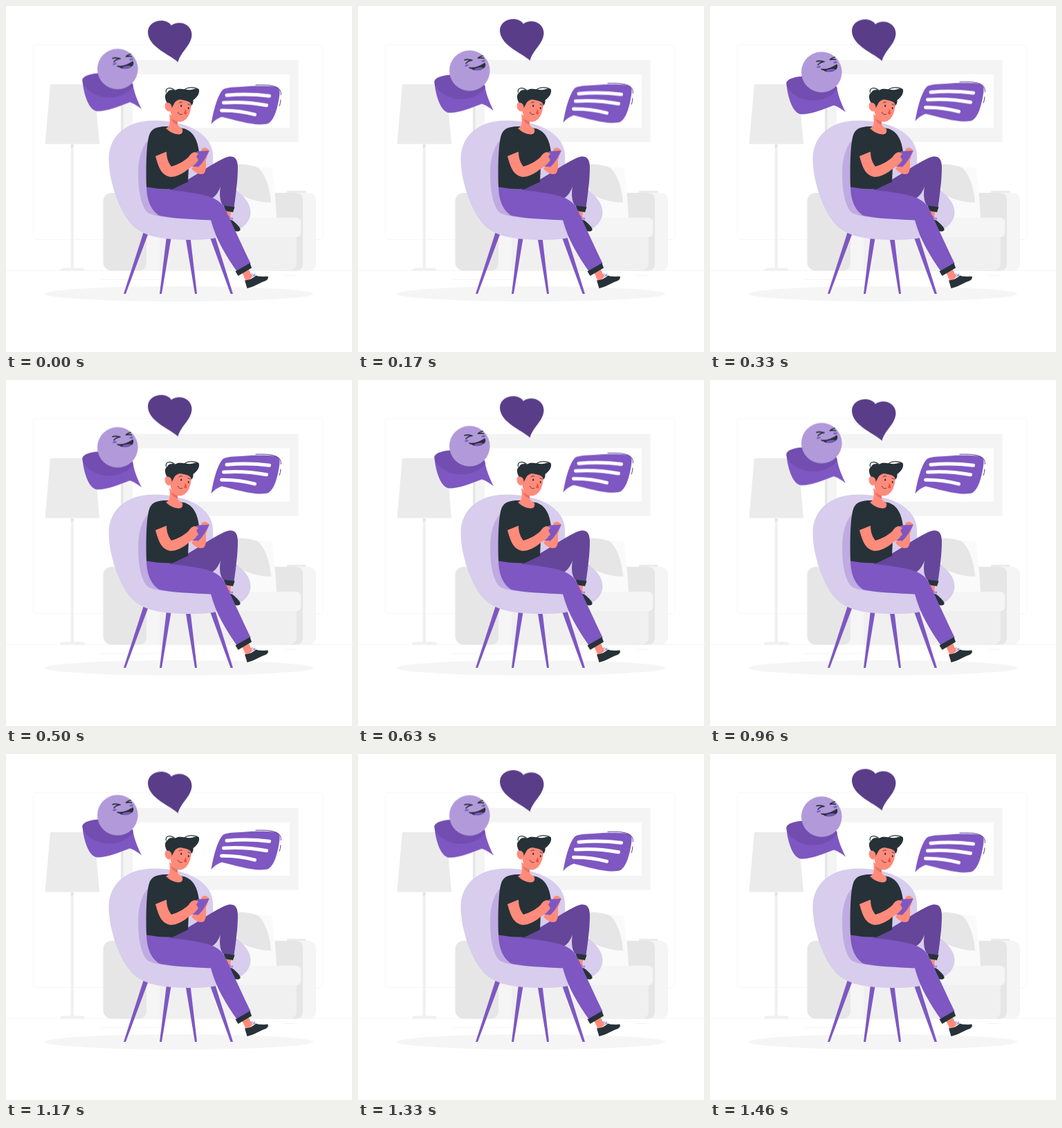
Recreate the animation shown at these times as an HTML page. Size 500 by 500 pixels, loop 1500 ms.

```html
<!DOCTYPE html>
<html lang="en">
<head>
<meta charset="utf-8">
<title>Chatting at home</title>
<style>
  html, body { margin: 0; width: 100%; height: 100%; overflow: hidden; background: #fff; }
  svg { display: block; width: 100%; height: 100%; }
  .main { fill: #7e57c2; }
  .dark { fill: #263238; }
  .skin { fill: #ff8b7b; }
  .ink { fill: none; stroke: #263238; stroke-linecap: round; stroke-linejoin: round; }
  .float { animation: float 1.5s linear infinite; }
  .message { animation-delay: -20ms; }
  .smile { animation-delay: -1015ms; }
  .heart { animation-delay: -519ms; }
  @keyframes float {
    50% { transform: translateY(-10px); }
  }
</style>
</head>
<body>
<svg viewBox="0 0 500 500">
  <defs>
    <path id="talk" d="M110.500 106C113 100 124 98 134 97L183 112C184.500 121 187 129 190 136C192 141 194 145 196 149C191 145 185 141 179 139C163 145 147 152 132 152C118 151 111 121 110.500 106Z"/>
    <clipPath id="talkClip"><use href="#talk"/></clipPath>
  </defs>

  <!-- room -->
  <g fill="none" stroke="#f5f5f5">
    <rect x="39.500" y="55.500" width="418.500" height="282" rx="4" stroke-width=".8"/>
    <path d="M0 382.500H500M135 395.500H222M400 389.500H417"/>
  </g>
  <path fill="#e6e6e6" d="M166 78H172V196H166Z"/>
  <path fill="#f4f4f4" d="M169.500 78H422.500V196.500H169.500Z"/>
  <path fill="#fff" d="M183 98.500H410V176H183Z"/>

  <!-- lamp -->
  <path fill="#f0f0f0" d="M93.700 200H97.800V380H93.700ZM78 382.500C78 380 80 378.500 83 378.500H109C112 378.500 114 380 114 382.500Z"/>
  <path fill="#e4e4e4" d="M93.700 200H97.800V203L93.700 206Z"/>
  <path fill="#ebebeb" d="M64 113H127.500L135 199.500H56.500Z"/>

  <!-- sofa -->
  <rect x="160" y="270" width="250" height="112.500" fill="#f0f0f0"/>
  <rect x="400" y="270" width="48" height="112.500" rx="11" fill="#f5f5f5"/>
  <path fill="#e6e6e6" d="M388 270H418Q429 270 429 281V371Q429 382.500 418 382.500H388Z"/>
  <rect x="140.500" y="270" width="63" height="112.500" rx="12" fill="#e6e6e6"/>
  <path fill="#f0f0f0" d="M222 333H420V371Q420 382.500 408 382.500H222Z"/>
  <path fill="#f5f5f5" d="M203 333H222V382.500H197Q203 380 203 371Z"/>
  <path fill="#fafafa" d="M334 229C352 230 370 233 384 234C387 255 390 280 391 308H334Z"/>
  <path fill="#e6e6e6" d="M334 229C345 228 358 230 366 235C376 246 382 266 383 284C365 284 347 278 334 270Z"/>
  <rect x="222" y="306" width="204" height="28" rx="6" fill="#f5f5f5"/>
  <path fill="#ebebeb" d="M406 270V268Q406 267 408 267H432Q434 267 434 270Z"/>

  <ellipse cx="250" cy="416" rx="194" ry="11" fill="#f5f5f5"/>

  <!-- chair -->
  <path class="main" d="M200 323L207 325L173 416H170ZM232 333H239L225 416H222ZM259.500 335H266.500L276 416H273ZM295 335L302.500 334L328 416H324.500Z"/>
  <path fill="#d8cded" d="M148.500 222C148 190 172 165 215 165.500C266 166 297 187 299 214C299 230 300 243 304 251C332 262 354 279 353.500 299C353 321 320 338 271 338C225 338 196 333 180 314C164 296 149 255 148.500 222Z"/>
  <path fill="#bfabe1" d="M210 190C197 199 191 220 191 242C191 267 195 288 204 298C215 306 255 308 298 309L296 270L240 250Z"/>

  <!-- far leg -->
  <path class="skin" d="M318 295L325 296L324 308L330 314L320 311Z"/>
  <path class="dark" d="M321 309C325 308 328 310 331 313C335 317 339 320 338.500 324C336 327 331 326 327 323Z"/>
  <path class="ink" stroke-width=".8" style="stroke:#7e57c2" d="M322 309C320 303 325 303 325 308C328 303 329 309 325 310"/>
  <path fill="#65469b" d="M234 266C262 254 290 232 316 219.500C329 214 335 220 335 233C335 253 332 273 329.500 291L314 289C309 283 308 272 310 261C307 269 303 275 297 278L250 271Z"/>
  <path class="dark" d="M315 288.500L330.500 290.500L328 298L316 296Z"/>

  <!-- near leg -->
  <path class="skin" d="M341 385L351 381L356 392L347 398Z"/>
  <path class="main" d="M203 260C228 266 256 267 280 272C302 276 313 283 319 298C329 320 342 348 353.500 372L334 384C317 360 303 336 296 309.500C268 308 240 307 222 303C208 295 203 277 203 260Z"/>
  <path class="dark" d="M331.500 383.500L352.500 371.500L355 378.500L335.500 390Z"/>
  <path class="dark" d="M345 396.500C352 396 358 393 361 389.500C367 391.500 374 391 378.500 390.500C379.500 394 378 396 374 397.500C365 401 358 406 348.500 408Z"/>
  <path class="ink" stroke-width=".8" style="stroke:#7e57c2" d="M357 391C352 387 356 385 358 390C359 385 362 388 358 391"/>

  <!-- torso -->
  <path class="dark" d="M234 174C222 174 212 175.500 208 184C203 195 202 228 203 261.500C219 264 233 265.500 241 264.500L263 254L264 232L279 211C277 194 271 181 257 177Z"/>
  <path class="skin" d="M236 156L248 166C247 171 249 174 255 178C256 183 254 185.500 249 185.500C241 185 234 180 231 176.500C236 175 238 171 236 156Z"/>
  <path fill="#e5705f" d="M239 163L248 167V171C243 170 240 167 239 163Z"/>

  <!-- hands -->
  <path class="skin" d="M268 235L280 222L282 208C285 203 290 204 294 209L289 222C289 230 290 237 286 242C279 245 272 240 268 235Z"/>
  <path class="main" d="M276 210L293.500 209C289 219 284 227 278 232.500L266 231.500Z"/>
  <path class="skin" d="M216 217L232 210.500C232 220 235 227 239 232C249 229 258 224 264 218C267 213 272 210 276 212L278 214L275 217L278 223L272 230C264 234 254 246 239 247C224 246 220 231 216 217Z"/>

  <!-- head -->
  <path class="skin" d="M240 137C248 129 262 131 268 137C268 147 266 156 262 161C258 167 251 169 245 166C240 163 238 156 237 149Z"/>
  <ellipse class="skin" cx="234.500" cy="145.500" rx="4.800" ry="7" transform="rotate(-14 234.500 145.500)"/>
  <path class="dark" d="M239.500 147.500C240 143 237 139 232.500 139.500C229 133 229 128 233 125C236 120 241 121 245 121.500C252 117 262 123 270 120.500C274 119 277 119 279 121.500C280 127 275 133 270.500 136C271 139 270 142 268 144C267 139 263 137 256 136C250 134 245 137 243 141Z"/>
  <path class="ink" stroke-width="1.200" d="M231.500 125C230 119 236 116.500 243 121M258 121C262 117 273 116.500 278.500 121"/>
  <g class="dark">
    <ellipse cx="253.200" cy="144.200" rx="1" ry="1.700"/>
    <ellipse cx="263.700" cy="147.600" rx="1" ry="1.700"/>
  </g>
  <path class="ink" stroke-width=".8" d="M250 140Q252 138 254.500 139M263 142Q265 141.500 266.500 143.500"/>
  <path fill="#e5503d" d="M259.500 149C260.500 152 261.500 154 261 156C259.500 157 258 156 257 155.500Z"/>
  <path class="ink" stroke-width=".8" d="M248.500 153.500C249 156 252 157.500 254.500 156.500"/>

  <!-- laughing face -->
  <g class="float smile"><g transform="translate(0 6.470)">
    <use href="#talk" class="main"/>
    <ellipse cx="149" cy="99" rx="41" ry="33" fill="#714eaf" clip-path="url(#talkClip)"/>
    <circle cx="161.300" cy="91" r="29.300" fill="#b29ada"/>
    <path class="ink" stroke-width="1.700" d="M154 75.500C157 74.500 161 75 165 76C161 76.500 158 78 156 80.500M180 69.500C177 70 175 71.500 173.500 73C176 72.500 179 72.500 181.500 73"/>
    <g class="main">
      <ellipse cx="157" cy="83.500" rx="3" ry="1.300" transform="rotate(-10 157 83.500)"/>
      <ellipse cx="181" cy="77" rx="3" ry="1.300" transform="rotate(-6 181 77)"/>
    </g>
    <path class="dark" d="M160 86C168 87.500 176 84.500 183 79.500C185 81 184.500 84 183 86.500C178 91.500 168 92 164 88.500C162 88.500 160 87.500 160 86Z"/>
    <path class="main" d="M167 89.500C171 86.500 178 85.500 181.500 87C178 90.500 171 91.500 167 89.500Z"/>
  </g></g>

  <!-- heart -->
  <g class="float heart">
    <path fill="#593d89" transform="translate(0 6.920)" d="M248.500 81C236 69.500 205 59 205 37C206 20 231 16 239 28C249 20 268 25 268.500 41C268 57 253 65 248.500 81Z"/>
  </g>

  <!-- message -->
  <g class="float message">
    <path class="main" d="M296.500 171.200C299.500 153 305 131 313 121.500C316 118.500 326 117.500 340 117C358 115.500 375 115.500 388 116.800C394 117.500 396 120 395.500 127C393 148 387 166 379 170C363 175 335 166 312 160.500C306 162.500 300 166.500 296.500 171.200Z"/>
    <path fill="none" stroke="#fff" stroke-width="5" stroke-linecap="round" d="M319 129.200Q350 126.500 380.500 130.200M314.500 140Q346 138 376.500 143.800M311.500 151.200Q336 150.700 359.500 157.200"/>
    <path class="ink" stroke-width="1" style="stroke:#593d89" d="M361 114.300C382 113.500 399 115.500 397.300 128.500M397 136Q396.600 140.500 395.300 144.500"/>
  </g>
</svg>
</body>
</html>
```
